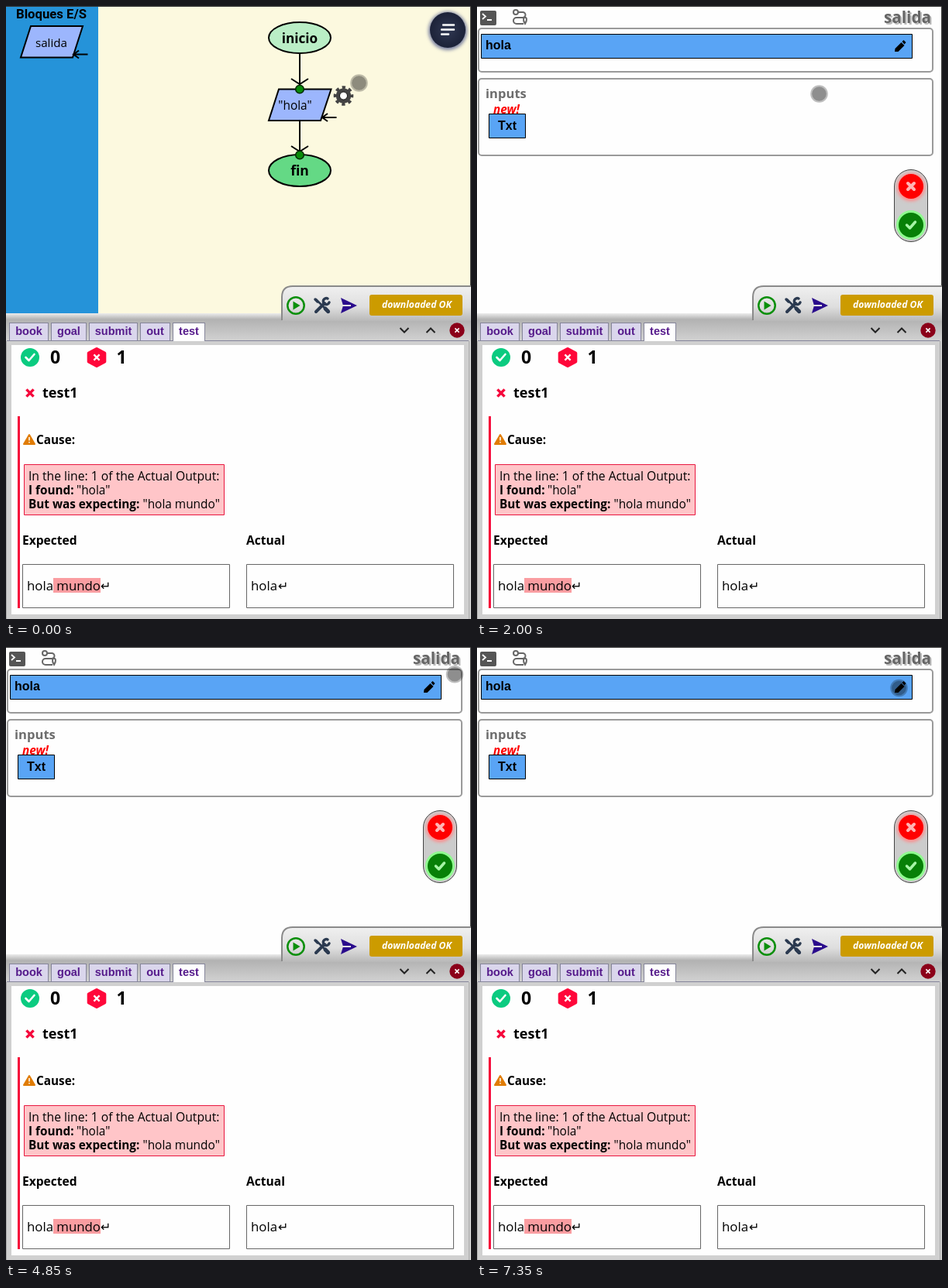
Animation of 600 by 792 pixels, one loop 8000 ms. Source, as an HTML page:

```html
<!DOCTYPE html>
<html lang="en">
<head>
<meta charset="utf-8">
<style>
html, body { margin: 0; width: 100%; height: 100%; overflow: hidden; background: #fefefe; }
svg { display: block; }
text { font: 15.4px "Open Sans", sans-serif; white-space: pre; }
.b { font-weight: 700; font-size: 15.3px; }
.i { font-style: italic; }
.mid { text-anchor: middle; }
.arial, .tabs text { font: 700 16px "Liberation Sans", sans-serif; }
.tabs text { font-size: 14.5px; fill: #551a8b; text-anchor: middle; }
.tabs rect { fill: #dad6ec; stroke: #85859a; }
.line { fill: none; stroke: #000; stroke-width: 2; }
.round { stroke-linecap: round; stroke-linejoin: round; }
.shape { stroke: #000; stroke-width: 2; }
</style>
</head>
<body>
<svg width="600" height="792" viewBox="0 0 600 792">
<defs>
  <linearGradient id="header" x2="0" y2="1">
    <stop stop-color="#ececec"/><stop offset=".22" stop-color="#b2b2b2"/><stop offset="1" stop-color="#d2d2d2"/>
  </linearGradient>
  <linearGradient id="toolbar" x2="0" y2="1">
    <stop stop-color="#f0f0f0"/><stop offset=".6" stop-color="#dedede"/><stop offset="1" stop-color="#b8b8b8"/>
  </linearGradient>
  <radialGradient id="fab"><stop stop-color="#303852"/><stop offset="1" stop-color="#1c2238"/></radialGradient>
  <filter id="blur" x="-50%" y="-50%" width="200%" height="200%"><feGaussianBlur stdDeviation="2"/></filter>
  <path id="output" class="line" d="M0 0h18.500M7-5 0 0l7 5"/>
  <path id="cross" d="M-4-4 4 4M4-4-4 4"/>
  <path id="check" d="M-5.500 0-1.500 4 5.500-4"/>
</defs>

<g id="diagram">
  <path fill="#fcf9df" d="M0 0h600v398H0z"/>
  <path fill="#2593d9" d="M0 0h119v397H0z"/>
  <text x="13" y="16" style="font:700 16.700px Roboto,sans-serif">Bloques E/S</text>
  <path class="shape" fill="#9cb6fd" d="M32 26h67L86 66.500H19z"/>
  <text class="mid" x="58.500" y="53" style="font-size:15.200px">salida</text>
  <use href="#output" x="87" y="62.500"/>
  <path class="line" d="M379 61v46M368 94l11 7 11-7M379 148v44M368 181l11 7 11-7"/>
  <ellipse class="shape" cx="379" cy="41" rx="40" ry="20" fill="#baeec6"/>
  <text class="b mid" x="379" y="48" style="font-size:17.200px">inicio</text>
  <path class="shape" fill="#9cb6fd" d="M352 107.500h67.500L406 148h-67z"/>
  <text class="mid" x="373" y="134">"hola"</text>
  <use href="#output" x="408" y="144"/>
  <ellipse class="shape" cx="379" cy="212.500" rx="40" ry="20.500" fill="#64d985"/>
  <text class="b mid" x="379" y="219" style="font-size:17.500px">fin</text>
  <g fill="#098a09" stroke="#022a02" stroke-width="1.500">
    <circle cx="379" cy="107.500" r="5.300"/><circle cx="379" cy="192.500" r="5.300"/>
  </g>
  <g transform="translate(435.500 116)" stroke="#444" fill="none">
    <circle r="10.800" stroke-width="4" stroke-dasharray="4.240" stroke-dashoffset="2.120"/>
    <circle r="7.300" stroke-width="5" fill="#fff"/>
    <circle r="5" stroke="#111" fill="#fefefe"/>
  </g>
  <circle cx="570" cy="32" r="25" fill="#7c82a0" filter="url(#blur)"/>
  <circle cx="570" cy="31" r="23" fill="url(#fab)"/>
  <path class="round" stroke="#fff" stroke-width="2.400" d="M564 24.500h14M562 30.500h16M562 36.500h9"/>
</g>

<g id="editor">
  <path fill="#fefefe" d="M0 0h600v398H0z"/>
  <rect x="4" y="6" width="21" height="19" rx="2" fill="#555"/>
  <path fill="none" stroke="#fff" stroke-width="1.800" d="m7 10 4 3.500-4 3.500M13 18h6"/>
  <g fill="none" stroke="#666" stroke-width="2">
    <circle cx="50" cy="8" r="3"/>
    <path d="M53 8h6a3.500 3.500 0 0 1 0 7h-8a4 4 0 0 0 0 8h9M62 23c-7-11 7-11 0 0z"/>
  </g>
  <text class="b" x="527" y="24" style="font-size:20.700px" fill="#bbb">salida</text>
  <text class="b" x="525" y="22" style="font-size:20.700px" fill="#666">salida</text>
  <g fill="none" stroke="#9a9a9a" stroke-width="2">
    <rect x="2" y="29" width="586" height="56" rx="4"/><rect x="2" y="94" width="586" height="99" rx="4"/>
  </g>
  <g fill="#59a4f5" stroke="#000">
    <path d="M5.500 36.500h556v31h-556z"/><path d="M15.500 139.500h47v31h-47z"/>
  </g>
  <text class="arial" x="11" y="56">hola</text>
  <text class="arial mid" x="39" y="160">Txt</text>
  <path d="m539 59 .5-4 8-8 4 4-8 8zM548.500 46l2-2 3 3-2 2.500z"/>
  <text class="b" x="11" y="118.500" style="font-size:16.600px" fill="#6c6c6c">inputs</text>
  <text class="b i" x="21" y="139" fill="#f00">new!</text>
  <rect x="538.500" y="211.500" width="43" height="93" rx="21.500" fill="#ccc" stroke="#444"/>
  <circle cx="560" cy="234" r="18" fill="#ff8a8a" filter="url(#blur)"/>
  <circle cx="560" cy="233" r="16" fill="#f00"/>
  <use href="#cross" x="560" y="233" stroke="#ffb4b4" stroke-width="4" stroke-linecap="round"/>
  <circle cx="560" cy="283" r="19" fill="#90fb90"/>
  <circle cx="560" cy="283" r="16" fill="#078007"/>
  <use class="round" href="#check" x="560" y="283" fill="none" stroke="#a5f5a5" stroke-width="3.500"/>
</g>
<path d="M0 .5h600M599.500 0v397" stroke="#333"/>

<path fill="url(#header)" d="M0 397h600v36H0z"/>
<path fill="#d0d0d0" d="M0 433h600v359H0z"/>
<path stroke="#aaa" d="M.5 433v359M597.500 433v359"/>
<path fill="#fefefe" d="M7 438h584v348H7z"/>
<path fill="url(#toolbar)" d="M356 407v-31q0-14 14-14h230v45z"/>
<path class="line" style="stroke:#8a8a8a" d="M356 406v-30q0-14 14-14h230"/>
<circle cx="374" cy="387" r="10.700" fill="none" stroke="#0a8f0a" stroke-width="2.500"/>
<path fill="#0a8f0a" d="M370.500 381.500v11l9-5.500z"/>
<g class="round" fill="none" stroke="#2b3a50">
  <path stroke-width="4" d="m400 395 11-11M412 391l4 4"/>
  <path stroke-width="2.500" d="m400 379 12 12"/>
  <path stroke-width="5" d="m412 391 3.500 3.500"/>
  <path stroke-width="3.500" d="M415 378a4 4 0 1 0 2 5M399 379l3 3"/>
</g>
<path fill="#2a0b8c" d="m432 377 21 10-21 10 3-10z"/>
<path stroke="#e4e4e4" stroke-width="2" d="M434 387h11"/>
<rect x="469" y="373" width="120" height="27" rx="3" fill="#cc9b00"/>
<text class="b i mid" x="530" y="390" style="font-size:12.200px" fill="#fff">downloaded OK</text>

<path stroke="#85859a" d="M1 432.500h596"/>
<g class="tabs" id="tabs"></g>
<path class="line" style="stroke:#222" d="m508.500 416 5.500 5.500 5.500-5.500M542.500 422l5.500-5.500 5.500 5.500"/>
<circle cx="582" cy="419" r="9.700" fill="#8b0019"/>
<use href="#cross" transform="translate(582 419) scale(.65)" stroke="#fff" stroke-width="2.300"/>

<circle cx="31" cy="454" r="12" fill="#0bcb80"/>
<use class="round" href="#check" x="31" y="454" fill="none" stroke="#fff" stroke-width="2.600"/>
<path class="round" fill="#ff073a" stroke="#ff073a" stroke-width="4" d="m117 443 10.300 5.500v11L117 465l-10.300-5.500v-11z"/>
<use href="#cross" transform="translate(117 454) scale(.9)" stroke="#fff" stroke-width="2.600"/>
<text class="b mid" x="63.500" y="462" style="font-size:23px">0</text>
<text class="b mid" x="149" y="462" style="font-size:23px">1</text>
<use href="#cross" transform="translate(31 500) scale(1.150)" stroke="#f5073a" stroke-width="3"/>
<text class="b" x="47" y="506" style="font-size:18px">test1</text>
<path fill="#f5073a" d="M15 530h3v248h-3z"/>
<path class="round" fill="#e07c05" stroke="#e07c05" stroke-width="2" d="m30 554 7 12H23z"/>
<path stroke="#fff" stroke-width="1.500" d="M30 557v4.500M30 563v1.500"/>
<text class="b" x="39" y="566">Cause:</text>
<path fill="#ffc5c8" stroke="#e8173f" d="M23.500 592.500h258v65h-258z"/>
<text x="29" y="613" style="font-size:15.700px">In the line: 1 of the Actual Output:</text>
<text class="b" x="29" y="631">I found:</text><text x="91" y="631">"hola"</text>
<text class="b" x="29" y="649">But was expecting:</text><text x="176.500" y="649">"hola mundo"</text>
<text class="b" x="21" y="696" style="font-size:15.600px">Expected</text>
<text class="b" x="310" y="696" style="font-size:15.600px">Actual</text>
<path fill="none" stroke="#666" d="M21.500 721.500h267v56h-267zM310.500 721.500h267v56h-267z"/>
<path fill="#fa9da1" d="M61 739h61v19H61z"/>
<g style="--s:16.800px">
  <text x="27" y="755" style="font-size:var(--s)">hola mundo</text>
  <text x="316" y="755" style="font-size:var(--s)">hola</text>
</g>
<text x="122" y="755" style="font:16px 'DejaVu Sans',sans-serif">↵</text>
<text x="351" y="755" style="font:16px 'DejaVu Sans',sans-serif">↵</text>

<g id="cursor">
  <circle r="11.300" fill="#000" fill-opacity=".25"/>
  <circle r="9.300" fill="#000" fill-opacity=".25"/>
</g>
</svg>
<script>
const $ = id => document.getElementById(id);
const LOOP = 8000, STEP = 50, EDITOR_OPENS = 2000;

const tabs = [['book', 4, 55], ['goal', 58, 104], ['submit', 107, 170], ['out', 173, 212], ['test', 215, 257]];
$('tabs').innerHTML = tabs.map(([name, left, right]) => {
  const active = name === 'test';
  return `<rect x="${left + .5}" y="409.5" width="${right - left - 1}" height="23"${active ? ' style="fill:#fefefe"' : ''}/>` +
    (active ? `<path stroke="#fefefe" d="M${left + 1} 432.5h${right - left - 2}"/>` : '') +
    `<text x="${(left + right) / 2}" y="425">${name}</text>`;
}).join('');

// Pointer keys: time, x, y; equal neighbours are pauses.
const keys = [
  [50, 455.5, 99.5], [400, 447, 107], [600, 447, 107], [900, 443, 111.5],
  [1050, 443, 111.5], [1200, 441.5, 113.5], [3650, 441.5, 113.5], [3700, 444.5, 114.5],
  [4100, 444.5, 114.5], [4900, 588, 30], [4950, 588, 30], [5800, 580, 35],
  [6100, 566, 46], [6200, 560, 48], [6400, 560, 48], [6600, 553, 51],
  [6700, 553, 51], [7050, 548, 52], [7200, 548, 52], [7350, 544.5, 53], [LOOP, 544.5, 53]
];

function pointerAt(time) {
  const next = keys.findIndex(key => key[0] > time);
  if (next < 1) return keys[0].slice(1);
  const [t0, x0, y0] = keys[next - 1], [t1, x1, y1] = keys[next];
  const k = (time - t0) / (t1 - t0);
  return [x0 + (x1 - x0) * k, y0 + (y1 - y0) * k];
}

function draw() {
  const time = Math.floor(performance.now() % LOOP / STEP) * STEP;
  const editing = time >= EDITOR_OPENS;
  $('diagram').style.display = editing ? 'none' : '';
  $('editor').style.display = editing ? '' : 'none';
  $('cursor').setAttribute('transform', `translate(${pointerAt(time)})`);
  requestAnimationFrame(draw);
}
draw();
</script>
</body>
</html>
```
